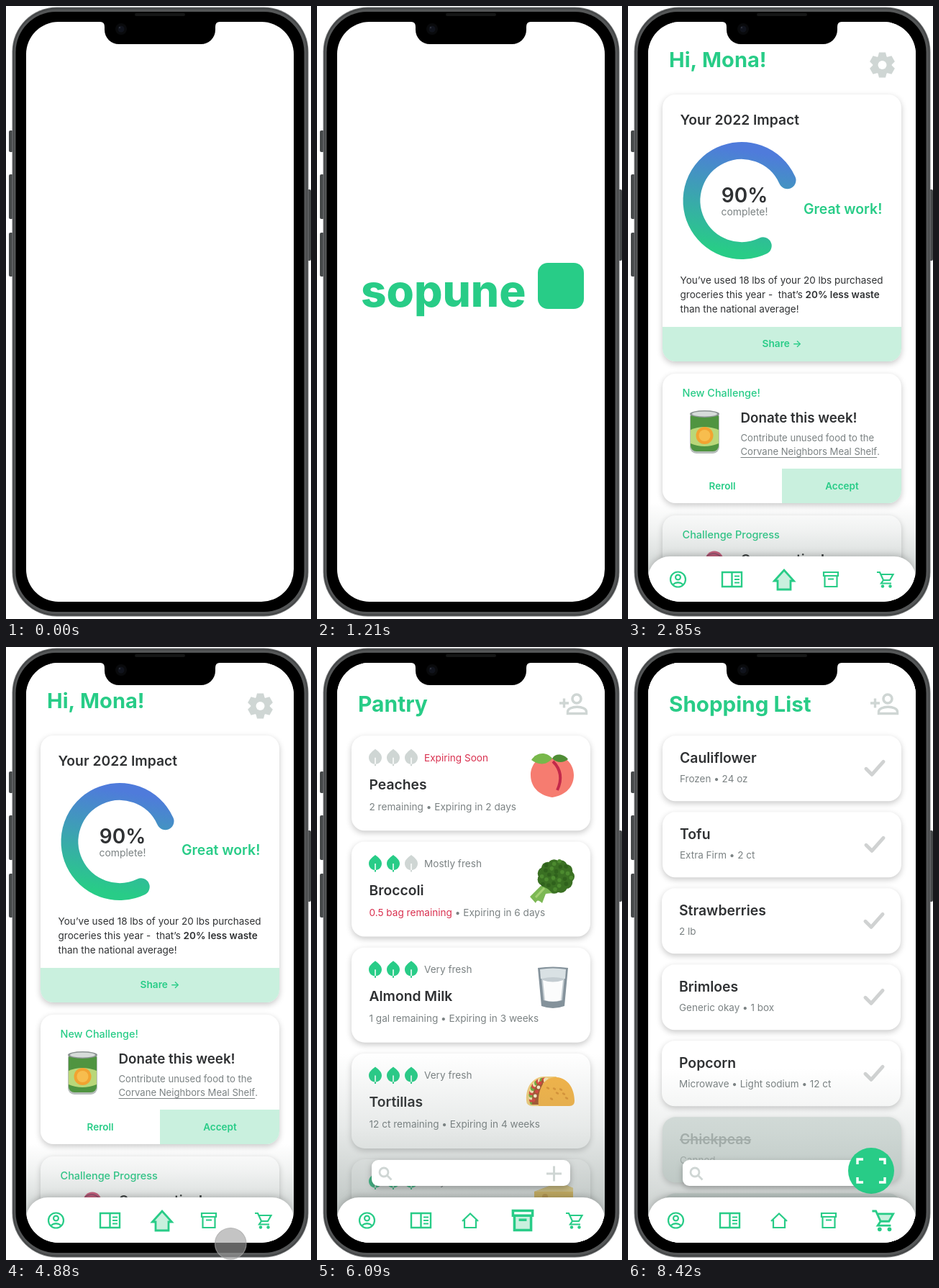
Animation of 424 by 852 pixels, one loop 9.94 s. Source, as an HTML page with a canvas:

```html
<!DOCTYPE html>
<html lang="en">
<head>
<meta charset="utf-8">
<title>Grocery app walkthrough</title>
<style>
html, body { margin: 0; width: 100%; height: 100%; overflow: hidden; background: #fff; }
canvas { display: block; width: 424px; height: 852px; }
</style>
</head>
<body>
<canvas id="stage"></canvas>
<script>
const W = 424, H = 852, LOOP = 9940;
const GREEN = '#28cc87', MINT = '#c9f0de', INK = '#2f3133', GRAY = '#7b8283', PALE = '#cfd6d4', RED = '#d9304f';
const FONT = 'Inter, "Open Sans", sans-serif';
const dpr = window.devicePixelRatio || 1;
let c;

function setup(canvas) {
  canvas.width = W * dpr;
  canvas.height = H * dpr;
  const ctx = canvas.getContext('2d');
  ctx.scale(dpr, dpr);
  return ctx;
}

// ---------- drawing helpers ----------
function text(s, x, y, size, weight, color, align = 'left') {
  c.font = `${weight} ${size}px ${FONT}`;
  c.fillStyle = color;
  c.textAlign = align;
  c.fillText(s, x, y);
  return c.measureText(s).width;
}
function box(x, y, w, h, r, color) {
  c.beginPath();
  c.roundRect(x, y, w, h, r);
  c.fillStyle = color;
  c.fill();
}
function disc(x, y, r, color) { oval(x, y, r, r, 0, color); }
function oval(x, y, rx, ry, turn, color) {
  c.beginPath();
  c.ellipse(x, y, rx, ry, turn, 0, 7);
  c.fillStyle = color;
  c.fill();
}
function fill(d, color) { c.fillStyle = color; c.fill(new Path2D(d)); }
function line(d, color, width) {
  c.strokeStyle = color;
  c.lineWidth = width;
  c.stroke(new Path2D(d));
}
function at(x, y, scale, draw) {
  c.save();
  c.translate(x, y);
  c.scale(scale, scale);
  draw();
  c.restore();
}
function shadowed(blur, dy, alpha, draw) {
  c.save();
  c.shadowColor = `rgba(0,0,0,${alpha})`;
  c.shadowBlur = blur * dpr;
  c.shadowOffsetY = dy * dpr;
  draw();
  c.restore();
}
function card(x, y, h, color = '#fff') {
  shadowed(9, 3, .22, () => box(x, y, 332, h, 18, color));
}
function fade(top, alpha) {
  const g = c.createLinearGradient(0, top, 0, 768);
  g.addColorStop(0, 'rgba(115,130,125,0)');
  g.addColorStop(.5, `rgba(115,130,125,${alpha * .4})`);
  g.addColorStop(1, `rgba(115,130,125,${alpha})`);
  c.fillStyle = g;
  c.fillRect(28, top, 372, 828 - top);
}

// ---------- icons ----------
function profile(x) {
  at(x, 797, 1, () => {
    line('M10.500 0A10.500 10.500 0 1 1-10.500 0A10.500 10.500 0 1 1 10.500 0', GREEN, 2.2);
    line('M3.400-3A3.400 3.400 0 1 1-3.400-3A3.400 3.400 0 1 1 3.400-3M-7 7Q0 1.500 7 7', GREEN, 2.2);
  });
}
function book(x) {
  at(x, 797, 1, () => {
    line('M-13.500-10H13.500V10H-13.500ZM0-10V10', GREEN, 2.4);
    line('M3.500-4.500H10.500M3.500 0H10.500M3.500 4.500H10.500', GREEN, 2);
  });
}
function house(x, on) {
  at(x, 797, 1, () => {
    if (on) {
      const d = 'M-13.500 2L0-13L13.500 2H9V14H-9V2Z';
      fill(d, MINT);
      line(d, GREEN, 2.8);
    } else {
      line('M-11 1L0-9.500L11 1M-8-1V10H8V-1', GREEN, 2.2);
    }
  });
}
function crate(x, on) {
  at(x, 797, on ? 1.36 : 1, () => {
    if (on) fill('M-9-5H9V10H-9Z', MINT);
    line('M-10-10H10V-5H-10ZM-8.500-5V10H8.500V-5M-4-.500H4', GREEN, on ? 2.6 : 2.2);
  });
}
function cart(x, on) {
  at(x, 797, on ? 1.3 : 1, () => {
    if (on) fill('M-7-7H10L6 1H-3Z', MINT);
    line('M-12-10H-8L-3 1H6L10.500-7H-6.500M-3 1L-6 5.500H8', GREEN, 2.2);
    disc(-4, 9.5, 2.2, GREEN);
    disc(6.5, 9.5, 2.2, GREEN);
  });
}
function nav(active, dx = 0) {
  shadowed(10, -2, .2, () => box(28, 765, 372, 80, [30, 30, 0, 0], '#fff'));
  profile(69.5 + dx);
  book(144.5 + dx);
  house(active === 'home' ? 217 : 213 + dx, active === 'home');
  crate(active === 'pantry' ? 286 : 282 + dx, active === 'pantry');
  cart(active === 'shop' ? 355 : 358, active === 'shop');
}
function gear(x, y) {
  at(x, y, 1, () => {
    for (let i = 0; i < 6; i++) {
      c.save();
      c.rotate(i * Math.PI / 3);
      fill('M-6.500-10L-4.500-17.500H4.500L6.500-10Z', PALE);
      c.restore();
    }
    disc(0, 0, 13, PALE);
    disc(0, 0, 6, '#fff');
  });
}
function addPerson() {
  line('M337 78H350M343.500 71.500V84.500', PALE, 3.4);
  line('M367 72A6 6 0 1 1 355 72A6 6 0 1 1 367 72', PALE, 3.6);
  line('M348.500 92.500V90C348.500 81 374.500 81 374.500 90V92.500Z', PALE, 3.4);
}
function leaf(x, y, color) {
  at(x, y, 1, () => {
    fill('M0-12C5-8 9-5 9 0C9 5 5 9 1 9V11.500H-1V9C-5 9-9 5-9 0C-9-5-5-8 0-12Z', color);
    line('M0 0V9', '#fff', 1.5);
  });
}
function search(withPlus) {
  shadowed(9, 3, .28, () => box(76, 713, 276, 36, 9, '#fff'));
  line('M99 730A6 6 0 1 1 87 730A6 6 0 1 1 99 730M97.500 734.500L103.500 740.500', PALE, 2.8);
  if (withPlus) line('M319 732H340M329.500 721.500V742.500', PALE, 3);
}

// ---------- food ----------
function can() {
  box(86, 566, 41, 56, [5, 5, 9, 9], '#b6bdba');
  box(87, 568, 39, 51, [3, 3, 8, 8], '#4f9440');
  fill('M87 589Q106 581 126 589V608Q106 616 87 608Z', '#b9d779');
  disc(106.5, 597, 12, '#f2a331');
  disc(106.5, 597, 8, '#f7bd4e');
  oval(106.5, 567, 20.5, 5, 0, '#8d9594');
  oval(106.5, 567, 17.5, 3.5, 0, '#d7dcda');
}
function peach() {
  fill('M327 155C343 147 357 162 357 178C357 197 342 207 327 209C312 207 297 197 297 178C297 162 311 147 327 155Z', '#f67c70');
  line('M328 159C339 170 341 184 334 199', '#c3294a', 4);
  fill('M298 157C306 145 320 146 327 155C319 165 307 164 298 157Z', '#78b84b');
  fill('M327 155C331 147 343 148 349 156C342 162 333 161 327 155Z', '#4f8d35');
}
function broccoli() {
  for (let i = 0; i < 11; i++) {
    const a = i * Math.PI * 2 / 11;
    disc(332 + 17 * Math.cos(a), 319 + 15 * Math.sin(a), 9, '#3a7023');
  }
  disc(332, 319, 18, '#3a7023');
  for (let i = 0; i < 24; i++) {
    const r = 4.7 * Math.sqrt(i);
    disc(332 + r * Math.cos(i * 2.4), 318 + r * .92 * Math.sin(i * 2.4), 2.8, i % 2 ? '#4c8a2f' : '#2f611c');
  }
  fill('M296 347L311 332Q320 334 327 342L318 343L313 356Q306 349 304 356Z', '#7cb854');
  line('M304 348L316 335', '#a3d073', 3);
}
function milk() {
  fill('M307 446Q328 443 349 446L344 499Q328 505 312 499Z', '#84929b');
  fill('M310 448Q328 445 346 448L345 461H311Z', '#d9e1e4');
  fill('M312 461Q328 457 344 461L341 491Q328 495 315 491Z', '#c3ccd1');
  fill('M314 463Q328 468 342 463L339 491Q328 494 317 491Z', '#fbfcfc');
}
function taco() {
  fill('M291 630C290 609 302 597 316 597H333L318 638H300Q291 638 291 630Z', '#f3cf7d');
  for (let i = 0; i < 15; i++) {
    const a = 2.75 + i * .15;
    disc(316 + 18 * Math.cos(a), 624 + 22 * Math.sin(a), 3.6, ['#6fae3b', '#d8453e', '#f4e3b0'][i % 3]);
  }
  fill('M299 636C298 617 305 605 315 602L309 636Z', '#a4552f');
  for (let i = 0; i < 5; i++) disc(301 + i * 2.3, 630 - i * 6, 2.4, i % 2 ? '#fbeecb' : '#d8453e');
  fill('M308 638C306 611 318 597 333 598C349 599 358 614 358 631Q358 638 351 638Z', '#f5b548');
  for (let i = 0; i < 7; i++) oval(321 + i * 13 % 30, 613 + i * 7 % 20, 2.4, 1.5, .5, '#dc9434');
}
function cheese() {
  fill('M302 757L337 744L356 752V785H302Z', '#f2c34e');
  fill('M302 757L337 744L356 752V757Z', '#f8d980');
  disc(317, 764, 4, '#d99f32');
}

// ---------- screens ----------
function home() {
  text('Hi, Mona!', 57, 85, 29, 700, GREEN);
  gear(353.5, 82);
  card(48, 123, 371);
  text('Your 2022 Impact', 72.5, 165, 19.3, 600, INK);
  text('90%', 162, 273, 28, 600, INK, 'center');
  text('complete!', 162, 291, 13.9, 400, GRAY, 'center');
  text('Great work!', 244, 289, 19.4, 600, GREEN);
  text('You’ve used 18 lbs of your 20 lbs purchased', 72.5, 386, 13.5, 400, INK);
  const w = text('groceries this year -\u00a0 that’s ', 72.5, 406, 13.5, 400, INK);
  text('20% less waste', 72.5 + w, 406, 13.5, 600, INK);
  text('than the national average!', 72.5, 426, 13.5, 400, INK);
  box(48, 446, 332, 48, [0, 0, 18, 18], MINT);
  text('Share →', 214, 474, 13.7, 600, GREEN, 'center');

  card(48, 511, 180);
  text('New Challenge!', 75.5, 543, 14.4, 500, GREEN);
  can();
  text('Donate this week!', 156.5, 579, 18.8, 600, INK);
  text('Contribute unused food to the', 156.5, 605, 13.1, 400, GRAY);
  const u = text('Corvane Neighbors Meal Shelf', 156.5, 624, 13.1, 400, GRAY);
  text('.', 156.5 + u, 624, 13.1, 400, GRAY);
  line(`M156.5 627.5H${156.5 + u}`, GRAY, 1);
  box(214, 643, 166, 48, [0, 0, 18, 0], MINT);
  text('Reroll', 131, 672, 13.5, 600, GREEN, 'center');
  text('Accept', 297.5, 672, 13.5, 600, GREEN, 'center');

  card(48, 708, 180);
  text('Challenge Progress', 75.5, 740, 14.5, 500, GREEN);
  disc(120, 770, 12.5, '#d8537a');
  line('M110 764Q120 757 130 766M109 770Q120 762 131 772', '#8f3f63', 1.5);
  text('Cooperative!', 156.5, 776, 18.8, 600, INK);
  fade(690, .26);
  nav('home');
}

const STOCK = [
  [0, 'Expiring Soon', 'Peaches', '2 remaining', '2 days'],
  [2, 'Mostly fresh', 'Broccoli', '0.5 bag remaining', '6 days'],
  [3, 'Very fresh', 'Almond Milk', '1 gal remaining', '3 weeks'],
  [3, 'Very fresh', 'Tortillas', '12 ct remaining', '4 weeks'],
  [3, 'Very fresh', 'Cheese', '1 lb remaining', '5 weeks']
];
function pantry() {
  text('Pantry', 57, 90, 30, 700, GREEN);
  addPerson();
  STOCK.forEach(([leaves, state, name, left, time], i) => {
    const y = 123.3 + i * 147.2;
    card(48, y, 132);
    for (let k = 0; k < 3; k++) leaf(81 + k * 25, y + 30.5, k < leaves ? GREEN : PALE);
    text(state, 149, y + 35.5, 13.6, 400, leaves ? GRAY : RED);
    text(name, 72.5, y + 74.5, 19.3, 600, INK);
    const w = text(left, 72.5, y + 103.5, 13.6, 400, i === 1 ? RED : GRAY);
    text(` • Expiring in ${time}`, 72.5 + w, y + 103.5, 13.6, 400, GRAY);
  });
  peach();
  broccoli();
  milk();
  taco();
  cheese();
  fade(565, .42);
  search(true);
  nav('pantry');
}

const LIST = [
  ['Cauliflower', 'Frozen • 24 oz'],
  ['Tofu', 'Extra Firm • 2 ct'],
  ['Strawberries', '2 lb'],
  ['Brimloes', 'Generic okay • 1 box'],
  ['Popcorn', 'Microwave • Light sodium • 12 ct'],
  ['Chickpeas', 'Canned'],
  ['', '']
];
function shop() {
  text('Shopping List', 57, 90, 29.6, 700, GREEN);
  addPerson();
  LIST.forEach(([name, note], i) => {
    const done = i > 4, y = 123.3 + i * 106, x = i > 1 && !done ? 47 : 48;
    card(x, y, 91, done ? '#dbe3e0' : '#fff');
    const w = text(name, x + 24, y + 37.5, 19.4, 600, done ? '#aab3b0' : INK);
    text(note, x + 24, y + 65, 13.5, 400, done ? '#aab3b0' : GRAY);
    if (done && w) line(`M${x + 24} ${y + 31.5}h${w}`, '#aab3b0', 1.8);
    if (!done) {
      c.lineCap = c.lineJoin = 'round';
      line(`M${x + 283} ${y + 46}L${x + 291} ${y + 54}L${x + 307} ${y + 36}`, '#d0d2d2', 5);
      c.lineCap = 'butt';
      c.lineJoin = 'miter';
    }
  });
  fade(585, .32);
  search(false);
  disc(338, 728, 32, GREEN);
  line('M319 719V712H327M349 712H357V719M357 737V744H349M327 744H319V737', '#fff', 3.4);
  nav('shop', -3);
}

function layer(draw) {
  const canvas = document.createElement('canvas');
  c = setup(canvas);
  c.fillStyle = '#fff';
  c.fillRect(0, 0, W, H);
  draw();
  return canvas;
}

function phoneBody() {
  for (const [x, y, h] of [[4, 173, 30], [4, 234, 62], [4, 315, 61], [418, 255, 99]]) box(x, y, 6, h, 2, '#46494a');
  box(8.5, 1.5, 412, 847, 62, '#77797a');
  box(9.5, 2.5, 410, 845, 61, '#414344');
  box(11, 4.5, 407, 841, 59, '#545657');
  box(13.5, 8, 401, 834, 56, '#000');
}
function notch() {
  fill('M131 22Q137 22 137 29V12H291V29Q291 22 297 22V12H131Z', '#000');
  box(137, 12, 154, 41, [0, 0, 20, 20], '#000');
  box(179, 10, 70, 4, 2, '#151616');
  disc(160, 32, 8, '#090a0c');
  disc(160, 32, 4.5, '#10131c');
  disc(158, 30, 1.2, '#2d313b');
}

function logo(alpha, scale) {
  c.globalAlpha = alpha;
  at(212, 394, scale, () => {
    text('sopune', -151, 24, 62, 800, GREEN);
    box(95, -37, 64, 64, 14, GREEN);
  });
  c.globalAlpha = 1;
}
function ring(p) {
  if (p <= 0) return;
  const from = 64.7 * Math.PI / 180, sweep = 271.3 * Math.PI / 180;
  const g = c.createLinearGradient(165, 345, 190, 205);
  g.addColorStop(0, GREEN);
  g.addColorStop(1, '#4f7bdb');
  c.beginPath();
  c.arc(158, 270.5, 69.5, from, from + sweep * p);
  c.strokeStyle = g;
  c.lineWidth = 24;
  c.lineCap = 'round';
  c.stroke();
  c.lineCap = 'butt';
}

// ---------- motion ----------
const part = (t, a, b) => Math.min(1, Math.max(0, (t - a) / (b - a)));
const easeOut = p => 1 - (1 - p) ** 3;
const easeBoth = p => p * p * (3 - 2 * p);

// touch paths: time, x, y
const TOUCHES = [
  [[4000, 345, 878], [4650, 297, 817], [4800, 297, 817], [4880, 312, 829], [5080, 360, 885]],
  [[6910, 440, 874], [7580, 375, 821], [7720, 375, 821], [7760, 390, 820.5], [7910, 450, 850]]
];
function touch(t) {
  for (const path of TOUCHES) {
    for (let i = 1; i < path.length; i++) {
      const [t0, x0, y0] = path[i - 1], [t1, x1, y1] = path[i];
      if (t < t0 || t >= t1) continue;
      const p = i === 1 ? easeBoth(part(t, t0, t1)) : part(t, t0, t1);
      disc(x0 + (x1 - x0) * p, y0 + (y1 - y0) * p, 21.8, 'rgba(160,160,160,.62)');
      c.strokeStyle = 'rgba(165,165,165,.7)';
      c.lineWidth = 1.2;
      c.stroke();
    }
  }
}

const screens = [home, pantry, shop].map(layer);
const main = setup(document.getElementById('stage'));

function show(i, alpha) {
  if (alpha <= 0) return;
  c.globalAlpha = alpha;
  c.drawImage(screens[i], 0, 0, W, H);
  c.globalAlpha = 1;
}

function draw(t) {
  c = main;
  c.fillStyle = '#fff';
  c.fillRect(0, 0, W, H);
  phoneBody();
  c.save();
  c.beginPath();
  c.roundRect(28, 22, 372, 806, 45);
  c.clip();
  c.fillStyle = '#fff';
  c.fillRect(28, 22, 372, 806);
  if (t < 1850) logo(part(t, 10, 210), .85 + .15 * easeBoth(part(t, 870, 1210)));
  show(0, easeBoth(part(t, 1330, 1850)));
  ring(easeBoth(part(t, 1850, 2830)));
  show(1, easeOut(part(t, 4920, 5500)));
  show(2, easeOut(part(t, 7765, 8330)));
  c.restore();
  notch();
  touch(t);
}

const start = performance.now();
function tick() {
  draw((performance.now() - start) % LOOP);
  requestAnimationFrame(tick);
}
draw(0);
requestAnimationFrame(tick);
</script>
</body>
</html>
```
